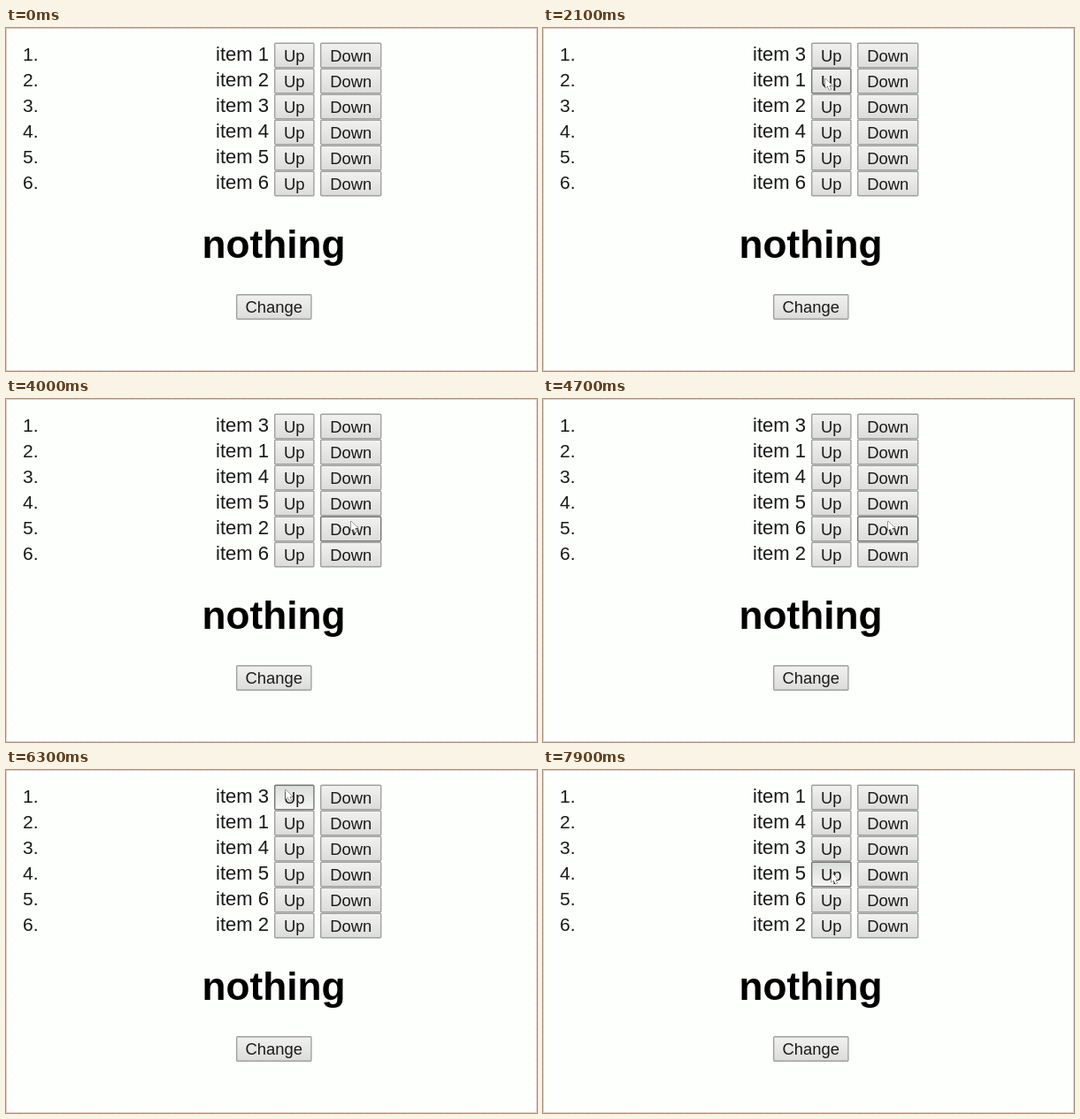
Recreate the animation shown at these times as an HTML page with a canvas. Size 600 by 388 pixels, loop 8 s.

```html
<!DOCTYPE html>
<html lang="en">
<head>
<meta charset="utf-8">
<title>Reorder list</title>
<style>
  html, body { margin: 0; width: 100%; height: 100%; overflow: hidden; background: #fdfffc; }
  canvas { display: block; }
</style>
</head>
<body>
<canvas id="stage" width="600" height="388"></canvas>
<script>
const ctx = document.getElementById('stage').getContext('2d');
const LOOP = 8000, STEP = 100, REST = 200, TRAVEL = 400;
const ROW = 29, TOP = 16.5, ZOOM = 1.381;
const FONT = '"Liberation Sans", Arial, sans-serif';
const arrow = new Path2D('M0 0V11L2.5 8.7L4.5 13L6.3 12.2L4.6 8H8Z');

// The pointer rests at each stop and clicks there unless it is idle.
const stops = [
  { time: 0, x: 440, y: 410, idle: true },
  { time: 1400, x: 319, y: 86 },
  { time: 1900, x: 319, y: 57 },
  { time: 3000, x: 372, y: 80 },
  { time: 3400, x: 380, y: 109 },
  { time: 4600, x: 390, y: 138 },
  { time: 5400, x: 343, y: 178, idle: true },
  { time: 6300, x: 316, y: 22 },
  { time: 6900, x: 318, y: 57 },
  { time: 7500, x: 322, y: 86 },
  { time: 7900, x: 326, y: 116 }
];
const clicks = stops.filter(stop => !stop.idle);

function pointerAt(t) {
  const i = stops.findLastIndex(stop => stop.time <= t);
  const from = stops[i], to = stops[i + 1] || from;
  const travel = Math.min(TRAVEL, to.time - from.time - REST);
  const k = Math.min(1, Math.max(0, (t - from.time - REST) / travel));
  const ease = k * k * (3 - 2 * k);
  return { x: from.x + (to.x - from.x) * ease, y: from.y + (to.y - from.y) * ease };
}

function orderAt(t) {
  const list = [1, 2, 3, 4, 5, 6];
  for (const { time, x, y } of clicks) {
    const row = Math.floor((y - TOP) / ROW);
    const other = row + (x < 352 ? -1 : 1);
    if (t >= time + STEP && other >= 0)
      [list[row], list[other]] = [list[other], list[row]];
  }
  return list;
}

function text(str, x, y, font, align = 'left') {
  ctx.font = `${font} ${FONT}`;
  ctx.textAlign = align;
  ctx.fillText(str, x, y);
}

function button(label, x, y, w, mouse, down) {
  const h = ROW;
  const hover = mouse.x >= x && mouse.x < x + w && mouse.y >= y && mouse.y < y + h;
  const shades = hover && down ? ['#dadcda', '#f6f7f5'] : ['#f2f3f1', '#dbdcda'];
  const fill = ctx.createLinearGradient(0, y, 0, y + h);
  shades.forEach((shade, i) => fill.addColorStop(i, shade));
  ctx.fillStyle = fill;
  ctx.strokeStyle = hover ? '#747574' : '#a0a19f';
  ctx.lineWidth = ZOOM;
  ctx.beginPath();
  ctx.roundRect(x + ZOOM / 2, y + ZOOM / 2, w - ZOOM, h - ZOOM, 1);
  ctx.fill();
  ctx.stroke();
  ctx.fillStyle = '#1a1a1a';
  text(label, x + w / 2, y + 21, `${13.33 * ZOOM}px`, 'center');
}

function pointer({ x, y }) {
  ctx.save();
  ctx.translate(x, y);
  ctx.lineWidth = 1;
  ctx.fillStyle = '#fff';
  ctx.strokeStyle = '#444';
  ctx.stroke(arrow);
  ctx.fill(arrow);
  ctx.restore();
}

function pageEdge() {
  ctx.lineWidth = 1;
  ctx.strokeStyle = '#dcd4d3';
  ctx.strokeRect(0.5, 0.5, 599, 387);
  ctx.setLineDash([4, 3]);
  ctx.strokeStyle = '#eec4c2';
  ctx.strokeRect(0.5, 0.5, 599, 387);
  ctx.setLineDash([]);
}

function draw(t) {
  const mouse = pointerAt(t);
  const down = clicks.some(({ time }) => t >= time && t < time + STEP);
  ctx.fillStyle = '#fdfffc';
  ctx.fillRect(0, 0, 600, 388);
  pageEdge();
  orderAt(t).forEach((item, i) => {
    const y = TOP + i * ROW;
    ctx.fillStyle = '#1a1a1a';
    text(`${i + 1}.`, 19, y + 20.5, '21px');
    text(`item ${item}`, 237, y + 20.5, `${16 * ZOOM}px`);
    button('Up', 303, y, 45.6, mouse, down);
    button('Down', 355, y, 69.4, mouse, down);
  });
  ctx.fillStyle = '#000';
  text('nothing', 302.5, 260, `bold ${32 * ZOOM}px`, 'center');
  button('Change', 260, 301, 85.6, mouse, down);
  pointer(mouse);
}

function frame() {
  const t = performance.now() % LOOP;
  draw(Math.floor(t / STEP) * STEP);
  requestAnimationFrame(frame);
}
frame();
</script>
</body>
</html>
```
